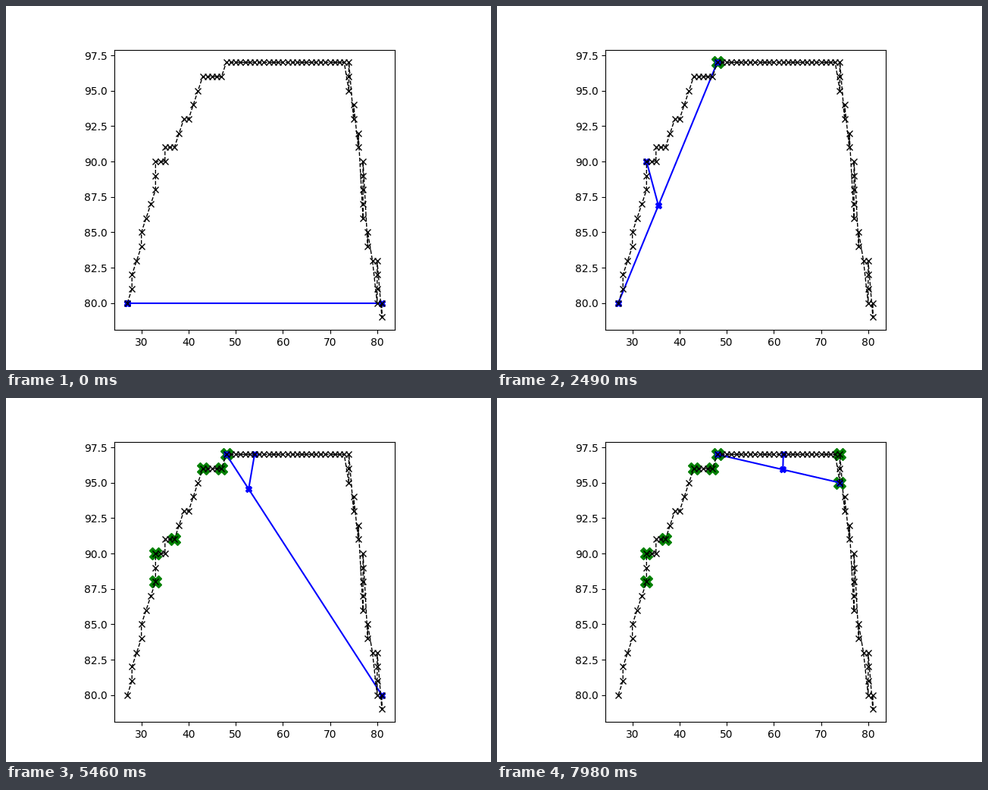
Recreate the animation shown at these times as a matplotlib script. Size 640 px wide and 480 px high, loop 8000 ms.

```python
"""Step-by-step Ramer-Douglas-Peucker simplification of a rasterised outline."""
from itertools import islice, pairwise
from math import ceil, floor

import matplotlib.pyplot as plt
import numpy as np
from matplotlib.animation import FuncAnimation

LOOP_MS = 8000
STEPS = 267
EPS = 0.7

CORNERS = [(27, 80), (31, 86), (33, 88), (33, 90), (35, 90), (35, 91),
           (37, 91), (39, 93), (40, 93), (43, 96), (47, 96), (48, 97),
           (74, 97), (74, 95), (76, 92), (76, 91), (77, 90), (77, 86),
           (79, 83), (80, 83), (80, 80), (81, 80), (81, 79)]


def raster(a, b):
    """Grid cells touched by the segment a-b in each integer column."""
    (x0, y0), (x1, y1) = a, b
    if x0 == x1:
        return {(x0, y) for y in range(min(y0, y1), max(y0, y1) + 1)}
    cells = set()
    for x in range(x0, x1 + 1):
        y = y0 + (y1 - y0) * (x - x0) / (x1 - x0)
        cells |= {(x, floor(y)), (x, ceil(y))}
    return cells


def project(p, a, b):
    """Foot of the perpendicular from p onto the line a-b."""
    d = b - a
    return a + d * np.dot(p - a, d) / np.dot(d, d)


def simplify(first, last, kept):
    """Yield (first, last, tested index, foot, kept indices) for every test."""
    if last - first < 2:
        return
    a, b = points[first], points[last]
    best, split = 0, first
    for i in range(first, last + 1):
        foot = project(points[i], a, b)
        yield first, last, i, foot, tuple(kept)
        dist = np.hypot(*(points[i] - foot))
        if dist > best + 1e-9:
            best, split = dist, i
    if best > EPS:
        kept.append(split)
        yield from simplify(first, split, kept)
        yield from simplify(split, last, kept)


cells = set().union(*(raster(a, b) for a, b in pairwise(CORNERS)))
points = np.array(sorted(cells), float)
states = list(islice(simplify(0, len(points) - 1, []), STEPS))

fig, ax = plt.subplots(figsize=(6.4, 4.8), dpi=100)
ax.set_box_aspect(1)
ax.plot(*points.T, "x--", color="k", lw=1, zorder=5)
ax.set(xlim=ax.get_xlim(), ylim=ax.get_ylim())

kept_marks, = ax.plot([], [], "gX", ms=12, zorder=3)
chord, = ax.plot([], [], "bX-", zorder=4)
normal, = ax.plot([], [], "bX-", zorder=4)


def draw(step):
    first, last, i, foot, kept = states[step]
    kept_marks.set_data(*points[list(kept)].T if kept else ([], []))
    chord.set_data(*points[[first, last]].T)
    normal.set_data(*np.array([points[i], foot]).T)
    return kept_marks, chord, normal


anim = FuncAnimation(fig, draw, frames=STEPS, interval=LOOP_MS / STEPS,
                     init_func=lambda: draw(0), repeat=True, repeat_delay=0)
plt.show()
```
